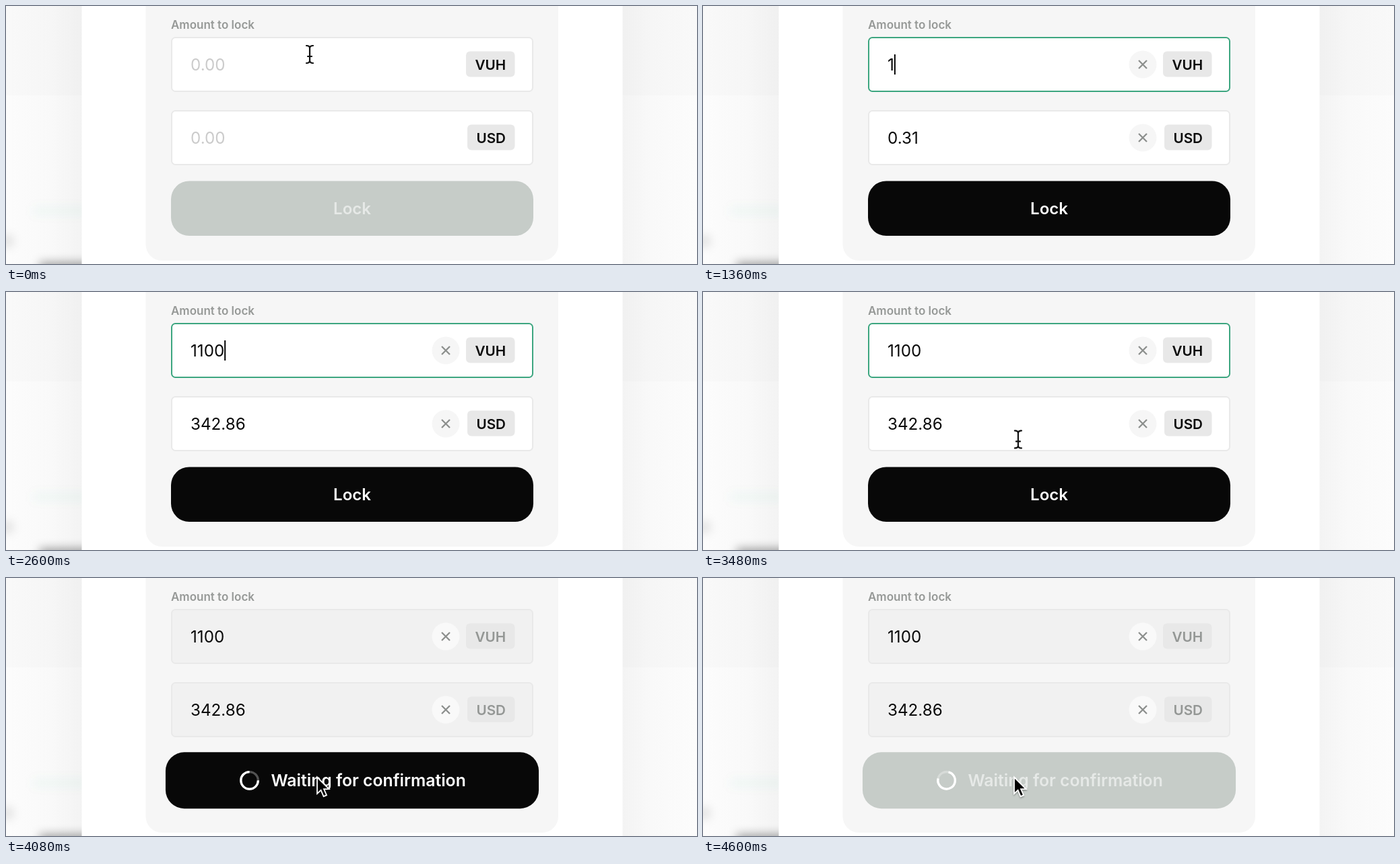
Recreate the animation shown at these times as an HTML page. Size 1026 px wide and 384 px high, loop 4640 ms.

```html
<!DOCTYPE html>
<html lang="en">
<head>
<meta charset="utf-8">
<style>
html, body { margin: 0; width: 100%; height: 100%; overflow: hidden; background: #fbfbfb; }
svg { display: block; width: 1026px; height: 384px; font-family: Inter, "Liberation Sans", sans-serif; }
.value { font-size: 24.2px; }
.tag { font-size: 20.7px; font-weight: 600; text-anchor: middle; }
.action { font-size: 24px; font-weight: 600; }
</style>
</head>
<body>
<svg viewBox="0 0 1026 384">
  <defs>
    <linearGradient id="side"><stop stop-color="#fcfcfc"/><stop offset=".6" stop-color="#f9f9f9"/><stop offset="1" stop-color="#f3f3f3"/></linearGradient>
    <filter id="blur" x="-100%" y="-100%" width="300%" height="300%"><feGaussianBlur stdDeviation="7"/></filter>
    <filter id="drop" x="-50%" y="-50%" width="200%" height="200%"><feDropShadow dx="0" dy="1.5" stdDeviation="1.2" flood-opacity=".35"/></filter>
  </defs>

  <rect width="113" height="384" fill="url(#side)"/>
  <rect width="113" height="384" fill="url(#side)" transform="matrix(-1 0 0 1 1026 0)"/>
  <path d="M0 0H1026V133H0Z" opacity=".012"/>
  <g filter="url(#blur)">
    <circle cx="2" cy="350" r="10" opacity=".1"/>
    <rect x="50" y="381" width="90" height="16" opacity=".35"/>
    <rect x="40" y="298" width="80" height="14" fill="#2fa57c" opacity=".04"/>
  </g>
  <rect x="112.5" width="803" height="384" fill="#fff"/>
  <rect x="207.5" y="-40" width="612.5" height="419" rx="24" fill="#f6f6f6"/>
  <text x="245" y="34" font-size="17" font-weight="600" fill="#969997">Amount to lock</text>

  <g id="rows"></g>
  <rect id="caret" y="72" width="2" height="30"/>

  <g id="button">
    <rect id="face" x="245" y="260.5" width="538" height="81.5" rx="27"/>
    <text id="lock" class="action" x="514" y="310" text-anchor="middle">Lock</text>
    <g id="wait">
      <text class="action" x="397" y="310">Waiting for confirmation</text>
      <g id="spinner" fill="none" stroke-width="3.2" stroke="#fff">
        <circle r="12.4" opacity=".3"/>
        <path d="M8.77 -8.77A12.4 12.4 0 1 1 -8.77 -8.77"/>
      </g>
    </g>
  </g>

  <g id="beam" fill="none" stroke-linecap="round">
    <path id="beamLine" d="M-5 -13Q0 -13 0 -9Q0 -13 5 -13M0 -9V9M-5 13Q0 13 0 9Q0 13 5 13M-3 3H3" stroke="#fff" stroke-width="4"/>
    <use href="#beamLine"/>
    <path d="M-5 -13Q0 -13 0 -9Q0 -13 5 -13M0 -9V9M-5 13Q0 13 0 9Q0 13 5 13M-3 3H3" stroke="#111" stroke-width="2.2"/>
  </g>
  <path id="arrow" d="M0 0V24.5L5.6 19.2L9.6 28.6L14 26.7L10 17.6H17.6Z" stroke="#fff" stroke-width="1.8" filter="url(#drop)"/>
</svg>

<script>
const $ = id => document.getElementById(id);
const set = (el, attrs) => { for (const k in attrs) el.setAttribute(k, attrs[k]); };
const show = (el, on) => el.style.display = on ? "" : "none";
const ramp = (t, start, length) => Math.min(1, Math.max(0, (t - start) / length));
const smooth = s => s * s * (3 - 2 * s);
const easeOut = s => 1 - (1 - s) ** 2.4;
const mix = (a, b, k) => `rgb(${a.map((v, i) => Math.round(v + (b[i] - v) * k))})`;
const gray = v => [v, v, v];

const row = (y, tag, width) => `<g transform="translate(0 ${y})">
  <rect class="box" x="246" y="1" width="536" height="80" rx="5.5" stroke-width="2"/>
  <text class="value" x="274" y="49.8"></text>
  <g class="clear">
    <circle cx="653" cy="41" r="20.5"/>
    <path d="M647 35l12 12m0 -12l-12 12" stroke="#8c8f8d" stroke-width="2.3"/>
  </g>
  <rect x="${755.5 - width}" y="21.5" width="${width}" height="38" rx="6" fill="#e8e8e8"/>
  <text class="tag" x="${755.5 - width / 2}" y="49">${tag}</text>
</g>`;
$("rows").innerHTML = row(46, "VUH", 72.5) + row(155, "USD", 70.5);
const rows = [...$("rows").children].map(g => {
  const [box, value, clear, , tag] = g.children;
  return { box, value, clear, tag };
});

// start time, amount, worth
const typed = [[0, "", ""], [1360, "1", "0.31"], [1960, "11", "3.43"], [2400, "110", "34.29"], [2600, "1100", "342.86"]];
const caretOn = [[240, 720], [1200, 1840], [1960, 3120], [3640, 3960]];

function draw(t) {
  const entry = typed.findLast(e => t >= e[0]);
  const filled = t >= 1360, waiting = t >= 4000;
  const off = ramp(t, 3920, 120);
  const focus = ramp(t, 160, 80) * (1 - off);

  rows.forEach((r, i) => {
    const text = entry[i + 1];
    r.value.textContent = text || "0.00";
    set(r.value, { fill: text ? "#0a0a0a" : "#cbcbcb" });
    set(r.box, {
      fill: mix(gray(255), gray(241), off),
      stroke: i ? "#e9e9e9" : mix(gray(233), [61, 166, 128], focus)
    });
    set(r.clear, { fill: mix(gray(246), gray(249), off) });
    set(r.tag, { fill: mix(gray(10), [148, 151, 149], off) });
    show(r.clear, filled);
  });

  const end = entry[1] ? rows[0].value.getComputedTextLength() : 0;
  set($("caret"), { x: 274 + end });
  show($("caret"), caretOn.some(([a, b]) => t >= a && t < b));

  const fade = filled ? easeOut(ramp(t, 4080, 150)) : 1;
  const grow = 1 + 0.03 * easeOut(ramp(t, 3540, 280));
  set($("button"), { transform: `translate(514 301.3) scale(${grow}) translate(-514 -301.3)`, fill: mix(gray(255), [230, 233, 231], fade) });
  set($("face"), { fill: mix(gray(8), [198, 204, 200], fade) });
  show($("lock"), !waiting);
  show($("wait"), waiting);
  set($("spinner"), { transform: `translate(366 301.3) rotate(${45 + (t - 4080) / 660 * 360})` });

  const go = smooth(ramp(t, 3280, 330));
  const x = 451 + 11 * go + 11 * Math.sin(Math.PI * go), y = 72 + 224.5 * go;
  const visible = t < 1360 || t >= 3320;
  const overInput = y < 128 || (y > 155 && y < 237);
  set($("beam"), { transform: `translate(${x} ${y})` });
  set($("arrow"), { transform: `translate(${x} ${y})` });
  show($("beam"), visible && overInput);
  show($("arrow"), visible && !overInput);
}

function tick() {
  draw(Math.floor(performance.now() % 4640 / 40) * 40);
  requestAnimationFrame(tick);
}
tick();
</script>
</body>
</html>
```
